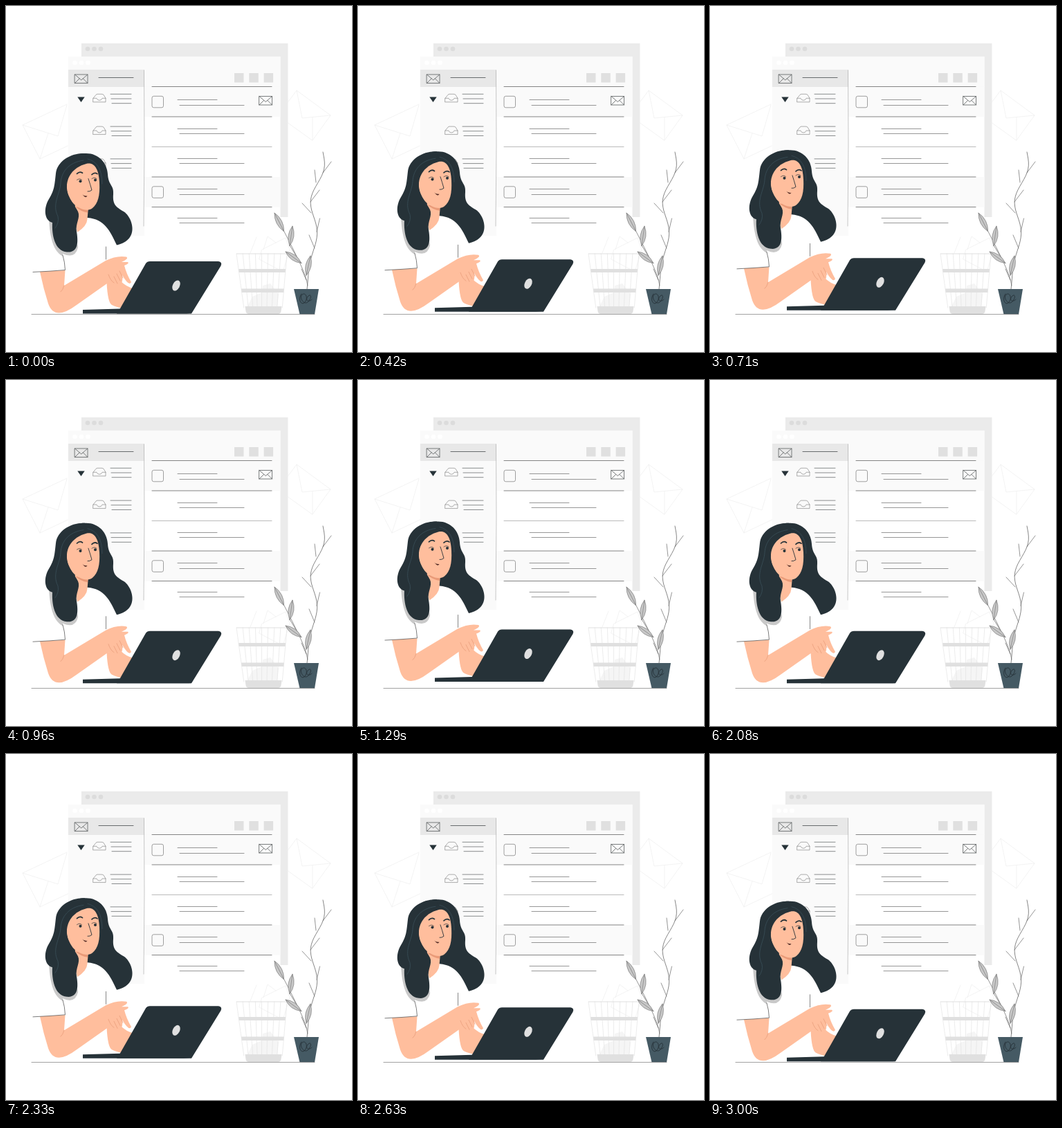
Write an HTML page that moves like this. It is 500x500 px and loops after 3.04 s.

```html
<!DOCTYPE html>
<html lang="en">
<head>
<meta charset="utf-8">
<title>Mail desk</title>
<style>
  html, body { margin: 0; width: 100%; height: 100%; overflow: hidden; background: #fff; }
  svg { display: block; width: 100vw; height: 100vh; }
  path { stroke-linecap: round; stroke-linejoin: round; }
</style>
</head>
<body>
<svg id="stage" viewBox="0 0 500 500"></svg>
<script>
const NS = "http://www.w3.org/2000/svg";
const stage = document.getElementById("stage");
const DARK = "#263238", SKIN = "#ffbe9d", INK = "#5a5d5f", PALE = "#eee", GREY = "#e0e0e0";
const LOOP = 3040, LIFT = 10;
let layer = stage;

function add(tag, attrs) {
  const node = document.createElementNS(NS, tag);
  for (const key in attrs) node.setAttribute(key, attrs[key]);
  return layer.appendChild(node);
}
const fill = (d, color) => add("path", { d, fill: color });
const draw = (d, color = INK, width = 0.7) =>
  add("path", { d, fill: "none", stroke: color, "stroke-width": width });
const box = (x, y, width, height, color) => add("rect", { x, y, width, height, fill: color });
const dot = (cx, cy, r, color) => add("circle", { cx, cy, r, fill: color });
const rule = (x, y, length, color, width) => draw(`M${x} ${y}h${length}`, color, width);
const mix = (a, b, t) => a + (b - a) * t;

function repeat(count, place) {
  for (let i = 0; i < count; i++) place(i);
}

// Path through samples of point(t) for t from 0 to 1.
function trace(point, steps = 40) {
  return "M" + Array.from({ length: steps + 1 }, (_, i) => point(i / steps)).join("L");
}

// Rectangle with two folds meeting on the centre line.
function mailIcon(x, y) {
  draw(`M${x} ${y}h18.5v12.5h-18.5zl9.3 8 9.2-8m0 12.5l-6.5-6.5m-12 6.5l6.5-6.5`, INK, 0.8);
}

function trayIcon(x, y) {
  draw(`M${x} ${y + 6}l4-5q1-1 2-1h6q2 0 3 1l3 5v5.5h-18zh5q1 3 4 3t4-3h5`, "#777", 0.6);
}

function floatingMail() {
  draw("M88 142L24 172L49 221L100 197M24 172L75 188L88 143M49 221L61 184", PALE);
  draw("M393 158L420 122L469 158L443 194ZM420 122L428 162L469 158M443 194V161", PALE);
}

function mailWindow() {
  box(109, 54, 298.5, 251, "#ebebeb");
  box(90, 73, 306.5, 259, "#fff");
  box(90, 73, 306.5, 44, "#fafafa");
  box(90, 117, 110, 215, "#fafafa");
  box(90, 92, 110, 25, "#e8e8e8");
  repeat(3, i => {
    dot(118 + 9.5 * i, 62, 3.3, "#dcdcdc");
    dot(99.5 + 9.5 * i, 82, 3.3, "#fff");
    box(330 + 21.3 * i, 97, 13.5, 13.5, GREY);
  });

  mailIcon(99.5, 99);
  rule(134, 103.5, 50, INK, 0.9);
  fill("M103.3 131.5h10.4l-5.2 7.5z", DARK);
  repeat(3, folder => {
    const top = 127.3 + 46.8 * folder;
    trayIcon(126, top);
    repeat(3, i => rule(151 + i, top + 6.7 * i, 30 - i));
  });

  repeat(5, row => {
    const top = 116.5 + 43.5 * row, shaded = row % 3 === 0;
    if (shaded) {
      box(200, top, 196.5, 43.5, "#fafafa");
      add("rect", { x: 211, y: top + 13.8, width: 16.5, height: 16.5, rx: 2.5,
        fill: "none", stroke: "#777", "stroke-width": 0.7 });
    }
    const text = 134.5 + 43 * row + shaded;
    rule(248, text, 57, "#6a6a6a");
    rule(251, text + 7 + shaded, 93, "#6a6a6a");
  });
  repeat(5, row => rule(211, 116.5 + 43.5 * row, 173, row === 2 ? "#aaa" : "#666", 0.8));
  draw("M199.5 93L200 200L199 318", "#b0b0b0", 0.7);
  mailIcon(366, 130.5);
}

function bin() {
  draw("M353 357L362 334M372 352L378 333L390 342M370 352L404 335L410 352L400 384L366 366Z", PALE);
  fill("M349 434L356 420L370 414L371 404L382 401L394 417L392 435Z", "#f5f5f5");

  const side = (y, edge) => mix(369.5, edge < 0 ? mix(333, 345, (y - 358) / 87)
    : mix(406, 398.5, (y - 358) / 87), Math.abs(edge));
  repeat(9, i => {
    const edge = i / 4 - 1;
    draw(`M${side(358, edge)} 358L${side(436, edge)} 436`, "#e4e4e4", 0.7);
  });
  const band = (top, bottom) => fill(
    `M${side(top, -1)} ${top}H${side(top, 1)}L${side(bottom, 1)} ${bottom}H${side(bottom, -1)}Z`, GREY);
  band(357.5, 358.5);
  band(380, 385);
  band(408.5, 414);
  fill("M345.5 434H398.5L397.5 441Q397 445 393 445H351Q347 445 346.5 441Z", GREY);
}

function leaf(x, y, length, angle) {
  const half = length / 2;
  const blade = add("path", {
    d: `M0 0Q${half} -8 ${length} 0Q${half} 8 0 0H${length}`,
    fill: "#c8c8c8", stroke: "#777", "stroke-width": 0.6
  });
  blade.setAttribute("transform", `translate(${x} ${y}) rotate(${angle})`);
}

function plant() {
  // The sway is nil at both ends and widest two thirds of the way up.
  draw(trace(t => {
    const sway = 65 * t * t * (1 - t) * Math.cos(10.5 * (t - 0.35));
    return [mix(435, 458, t) + sway, mix(409, 211, t)];
  }), "#666", 0.8);
  draw("M458 241L470 225M446 237L448 255M440 283L453 266M428 285L441 299M449 326L453.5 307M438 331L446 350", "#666");
  draw("M402 326Q414 349 424 370T436 404M410 346Q418 360 427 372M427 380L434 396", "#666");
  leaf(388, 299, 30, 63);
  leaf(414, 318, 29, 98);
  leaf(404, 355, 28, 36);
  leaf(440, 361, 29, 102);
  fill("M416 409H452L446 445.5H424.5Z", "#455a64");
  draw("M427 416C421 424 427 434 432 428S433 413 428 417S431 434 437 427S440 415 436 420S437 429 442 424", DARK, 0.9);
}

function body() {
  fill("M62 308C64 344 72 363 92 364Q104 364 105 349L92 320Z", "#c9c9c9");
  fill("M104 312Q118 304 134 308L160 345L145 348V404H84L82 358Q100 366 104 349Z", "#fff");

  fill("M145.5 400Q147 429 153 432T169 437L184 408Q174 406 165 397Z", SKIN);
  fill("M49 384L85.5 382L84 404L144 368Q160 360 174 362.5Q178 365 167 370L176 370Q179 372 171 375Q174 387 181 399Q178 406 168 389Q170 404 160 403Q151 398 146 401L102 432Q70 456 61 430Q54 408 49 384Z", SKIN);
  draw("M84 404Q82 411 79 413M148 388Q151 397 156 400", "#e69a78");
  repeat(3, i => draw(`M${156 + 4 * i} ${391 - 4 * i}l5 10`, "#e69a78"));
  draw("M39 384.5L63 383.2L85.5 381.5Q85 370 82 360", "#444");
  draw("M144.5 348V366", "#555");
}

function head() {
  fill("M114 213C133 212 146 226 147 243S156 258 155 272S158 290 170 297S195 338 160 345.5C150 324 142 308 118 306S84 290 84 255S98 213 114 213Z", DARK);
  fill("M100 283L119 291L117.5 308Q117 318 103 327L99 310Z", SKIN);
  fill("M100 290Q108 297 118 298.5V293Z", "#e99a78");
  fill("M88 258C90 240 104 231 116 228S134 236 135 255S133 285 125 292S103 291 98 286S87 272 88 258Z", SKIN);
  fill("M114 213C94 212 74 224 72 242S70 266 62 279S55 310 67 313C66 330 70 354 88 355.5S104 338 102 326S108 306 104 297S84 272 88 254S100 232 116 227Z", DARK);
  draw("M112 223C90 226 80 240 79 256S66 286 75 304Q77 313 71 321", "#3d535e");
  draw("M118 221Q139 226 139 257", "#3d535e", 0.6);

  const eye = (x, y, tilt) => {
    dot(x, y, 2, DARK);
    draw(`M${x - 5} ${y - 2}q4-3 7 0`, DARK);
    draw(`M${x - 5} ${y - 10 + tilt}q4-4 8-1`, DARK, 1.7);
  };
  eye(107.5, 253.3, -1);
  eye(129, 251.6, 2);
  draw("M119 249.5Q121.5 257 124 266Q121 268.5 118 268", DARK, 0.9);
  fill("M110 271.5Q112 275 117.5 274.5Q115 279 110 271.5Z", "#522b25");
}

function laptop() {
  fill("M111 439L165 437.5L268 444.5H111Z", DARK);
  fill("M165 437L202 372Q204 369 208 369H307Q313 370 310.5 375.5L268 444.5H160Z", DARK);
  add("ellipse", { cx: 246, cy: 404, rx: 5, ry: 8, transform: "rotate(27 246 404)", fill: GREY });
}

floatingMail();
mailWindow();
bin();
plant();
rule(37, 445.5, 409, "#8b8b8b", 0.8);

const person = layer = add("g", {});
body();
head();
laptop();

function render(time) {
  const phase = time % LOOP / LOOP;
  const rise = LIFT * (1 - Math.abs(2 * phase - 1));
  person.setAttribute("transform", `translate(0 ${-rise.toFixed(3)})`);
}

let start;
function tick(now) {
  start ??= now;
  render(now - start);
  requestAnimationFrame(tick);
}
render(0);
requestAnimationFrame(tick);
</script>
</body>
</html>
```
